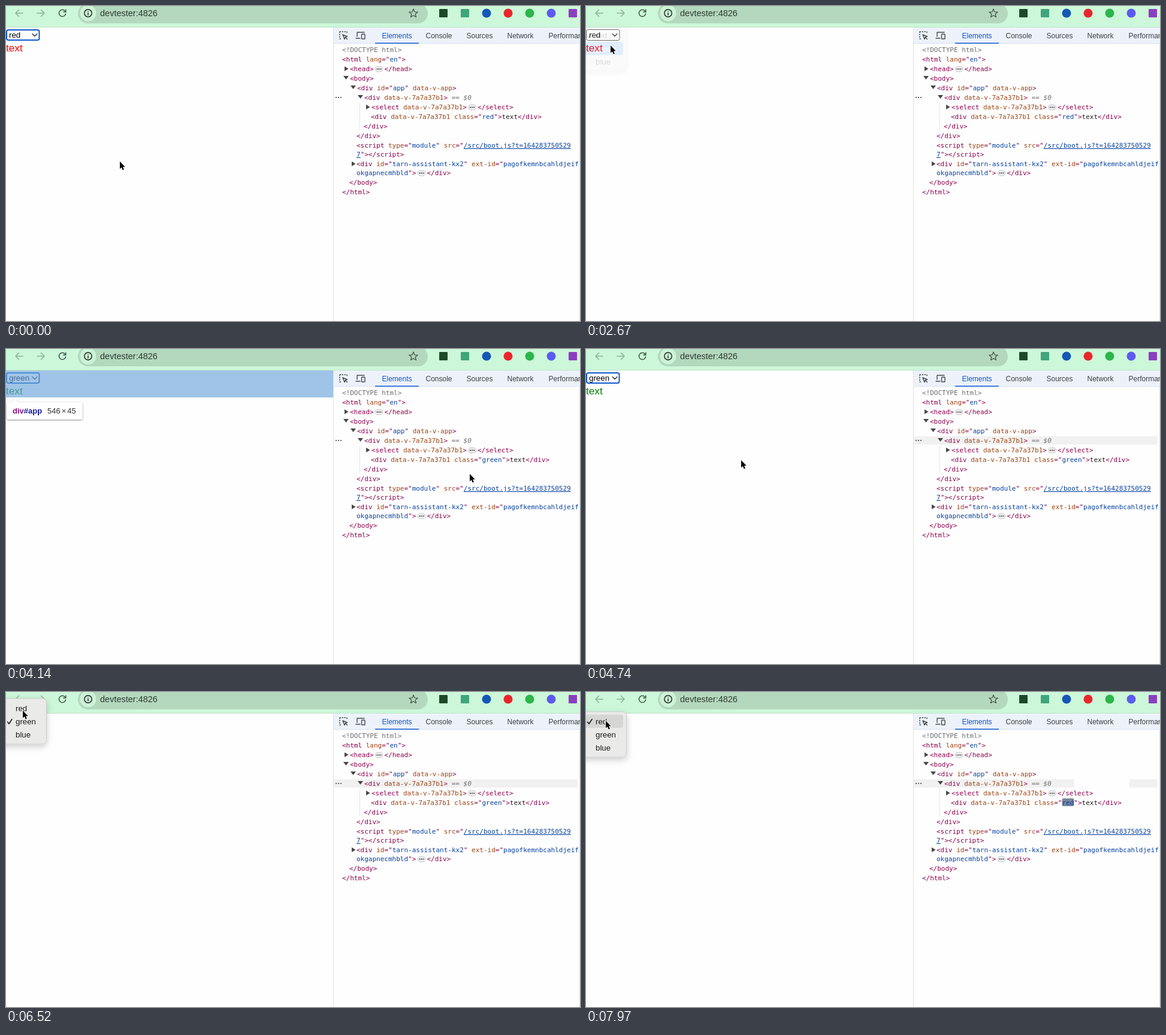
Write an HTML page that moves like this. It is 958x527 px and loops after 8 s.

```html
<!DOCTYPE html>
<html lang="en">
<head>
<meta charset="utf-8">
<title>Select demo</title>
<style>
html, body { margin: 0; width: 100%; height: 100%; overflow: hidden; background: #fefefe; }
svg { display: block; width: 100%; height: 100%; }
text { font-family: "Liberation Sans", Arial, sans-serif; white-space: pre; }
.code text { font: 11px "DejaVu Sans Mono", Menlo, monospace; }
.line { fill: none; stroke-linecap: round; stroke-linejoin: round; }
.t { fill: #8e004b; }
.n { fill: #9f4312; }
.v { fill: #0842a0; }
.l { fill: #0842a0; text-decoration: underline; }
.g { fill: #6e6e6e; }
.i { fill: #6e6e6e; font-style: italic; }
.x { fill: #1f1f1f; }
</style>
</head>
<body>
<svg viewBox="0 0 958 527" xmlns="http://www.w3.org/2000/svg">
  <defs>
    <filter id="soft" x="-30%" y="-30%" width="160%" height="170%">
      <feDropShadow dx="0" dy="4" stdDeviation="5.5" flood-opacity=".2"/>
    </filter>
    <filter id="tipShade" x="-20%" y="-40%" width="140%" height="190%">
      <feDropShadow dx="0" dy="1" stdDeviation="1.5" flood-opacity=".45"/>
    </filter>
  </defs>
  <rect width="958" height="527" fill="#fefefe"/>

  <!-- browser bar -->
  <rect width="958" height="36" fill="#ccf7d8"/>
  <rect y="35" width="958" height="1" fill="#bfe3ca"/>
  <rect x="120" y="-4" width="584" height="33" rx="16.5" fill="#b4d8be"/>
  <circle cx="137" cy="12" r="13.500" fill="#cdf3d7"/>
  <g class="line" stroke-width="1.5">
    <path d="M28 12H16.500M21.500 6.500L16 12l5.500 5.500M52 12h11.500M58.500 6.500L64 12l-5.500 5.500" stroke="#8fb29a"/>
    <path d="M98.500 8.500A5.600 5.600 0 1 0 99.600 13M99.800 6v4h-4" stroke="#46574b"/>
    <circle cx="137" cy="12" r="6.200" stroke="#1f2b23"/>
    <path d="M137 11.500v3.500M137 8.900v.1" stroke="#1f2b23"/>
    <path id="star" stroke="#46574b" stroke-width="1.3"/>
  </g>
  <text x="157" y="17" font-size="14.5" fill="#2b3a30">devtester:4826</text>
  <g id="badges"></g>

  <!-- page -->
  <rect id="box" fill="#fff"/>
  <text id="choice" x="5" y="53" font-size="13.33"/>
  <path class="line" d="M44 46.500l4 4 4-4" stroke="#222" stroke-width="1.2"/>
  <text id="word" x="0" y="76" font-size="17.2">text</text>
  <g id="overlay">
    <rect y="36" width="546" height="45" fill="rgb(111,168,220)" fill-opacity=".66"/>
    <path d="M4.500 89H8l6.500-6.500L21 89h103.500a3 3 0 0 1 3 3v23a3 3 0 0 1-3 3H4.500a3 3 0 0 1-3-3V92a3 3 0 0 1 3-3z" fill="#fff" filter="url(#tipShade)"/>
    <text x="11" y="108" font-size="13" font-weight="bold" fill="#881280">div<tspan fill="#1a1aa6">#app</tspan></text>
    <text x="69" y="108" font-size="13" fill="#333">546<tspan dx="2">×</tspan><tspan dx="2">45</tspan></text>
  </g>

  <!-- inspector -->
  <rect x="547" y="36" width="411" height="491" fill="#fefefe"/>
  <rect x="547" y="36" width="411" height="27" fill="#edf2fa"/>
  <path d="M546.500 36V527M547 62.500H958M957.500 63V527" stroke="#d5e3f8" fill="none"/>
  <rect x="616" y="61.500" width="73" height="1.500" fill="#0b57d0"/>
  <g class="line" stroke="#454a50" stroke-width="1.400">
    <path d="M557 43h12M557 43v12M569 43v3M557 55h3" stroke-dasharray="1.500 2.500"/>
    <path d="M562 48l7.500 3-3.200 1.300-1.300 3.200zM566 52l3.500 3.500"/>
    <path d="M586 51v-7h12M584 54h7"/>
    <rect x="593.500" y="47" width="5.500" height="8" rx=".8"/>
  </g>
  <g id="tabs" font-size="12"></g>
  <g id="rowShade" fill="#f1f1f1">
    <rect id="shadeA" x="547" y="146" height="14"/>
    <rect x="907" y="146" width="47" height="14"/>
  </g>
  <path d="M590.500 162V208" stroke="#e6e6e6"/>
  <rect id="flash" x="794.500" y="178" height="13" rx="2" fill="#7b869c"/>
  <g id="tree" class="code"></g>

  <!-- dropdown -->
  <g id="menu">
    <rect x="-12" y="33" width="79.500" height="76" rx="6" fill="#eaeae8" stroke="#c6c6c6" stroke-width=".8" filter="url(#soft)"/>
    <rect id="hover" x="-6" width="68" height="22" rx="4"/>
    <g id="items" font-size="13.300"></g>
    <path id="check" class="line" d="M2.500 50l2.500 3.300 5-7.800" stroke-width="1.600"/>
  </g>
  <path id="cursor" d="M0 0V12.600L2.800 10 4.700 14.500 6.900 13.600 5 9.200H8.800z" stroke="#fff" stroke-width="1.600" paint-order="stroke"/>
</svg>

<script>
const NS = 'http://www.w3.org/2000/svg';
const LOOP = 8000, STEP = 147.5;
const $ = id => document.getElementById(id);
const set = (el, attrs) => { for (const a in attrs) el.setAttribute(a, attrs[a]); };
const show = (el, on) => { el.style.display = on ? '' : 'none'; };
function add(parent, tag, attrs, text) {
  const el = document.createElementNS(NS, tag);
  set(el, attrs);
  if (text !== undefined) el.textContent = text;
  parent.appendChild(el);
  return el;
}

// Each part of a row starts with the letter of its colour class.
function row(x, y, parts) {
  const line = add($('tree'), 'text', { x, y: y + 4 });
  return parts.split('|').map(p => add(line, 'tspan', { class: p[0] }, p.slice(1)));
}
function fold(x, y, open) {
  const d = open ? `M${x - 4.5} ${y - 4}h9l-4.5 6z` : `M${x - 3} ${y - 4}l6.5 4-6.5 4z`;
  add($('tree'), 'path', { d, fill: '#474747' });
}
function dots(x, y, gap) {
  for (let i = -1; i < 2; i++) add($('tree'), 'circle', { cx: x + i * gap, cy: y, r: 1.1, fill: '#444' });
}
function more(x, y) {
  add($('tree'), 'rect', { x: x - 6.5, y: y - 4, width: 13, height: 9, rx: 4.5, fill: '#eee', stroke: '#bdbdbd', 'stroke-width': .8 });
  dots(x, y + .5, 3);
}

row(561, 73, 'g<!DOCTYPE html>');
row(561, 89, 't<html |nlang|t="|ven|t">');
row(574, 105, 't<head>');
row(631.5, 105, 't</head>');
row(574, 121, 't<body>');
row(586, 137, 't<div |nid|t="|vapp|t" |ndata-v-app|t>');
row(598, 153, 't<div |ndata-v-7a7a37b1|t>|g == |i$0');
row(610, 169, 't<select |ndata-v-7a7a37b1|t>');
row(787, 169, 't</select>');
const classValue = row(609, 185, 't<div |ndata-v-7a7a37b1 class|t="|vred|t">|xtext|t</div>')[3];
row(597, 201, 't</div>');
row(585, 217, 't</div>');
row(585, 233, 't<script |ntype|t="|vmodule|t" |nsrc|t="|l/src/boot.js?t=164283750529');
row(585, 248, 'l7|t"></' + 'script>');
row(585, 264, 't<div |nid|t="|vtarn-assistant-kx2|t" |next-id|t="|vpagofkemnbcahldjeif');
row(585, 279, 'vokgapnecmhbld|t">');
row(702.5, 279, 't</div>');
row(573, 295, 't</body>');
row(561, 311, 't</html>');
fold(568, 105); fold(567.5, 121, true); fold(579.5, 137, true);
fold(591.5, 153, true); fold(604, 169); fold(580, 264);
more(622.5, 105); more(778, 169); more(693.5, 279);
dots(555, 153, 4);

[['Elements', 627.5], ['Console', 700.5], ['Sources', 768.5], ['Network', 836.5], ['Performance', 905.5]]
  .forEach(([name, x], i) => add($('tabs'), 'text', { x, y: 53.5, fill: i ? '#3c4043' : '#0b57d0' }, name));

// Toolbar extensions: plain squares and circles.
[['#1c4a28', 1], ['#3fa57c', 1], ['#1556b8', 0], ['#e8262c', 0], ['#2cb54a', 0], ['#5b5bf0', 0], ['#8a3fc0', 1]]
  .forEach(([fill, square], i) => {
    const cx = 730 + 36 * i;
    if (square) add($('badges'), 'rect', { x: cx - 7, y: 5, width: 14, height: 14, rx: 1, fill });
    else add($('badges'), 'circle', { cx, cy: 12, r: 7.5, fill });
  });

let star = '';
for (let i = 0; i < 10; i++) {
  const r = i % 2 ? 3.3 : 7.5, a = i * Math.PI / 5;
  star += (i ? 'L' : 'M') + (680 + r * Math.sin(a)).toFixed(2) + ' ' + (12.5 - r * Math.cos(a)).toFixed(2);
}
set($('star'), { d: star + 'z' });

const labels = ['red', 'green', 'blue'];
const items = labels.map((name, i) => add($('items'), 'text', { x: 16, y: 54 + 22 * i }, name));

// Pointer stops: step, x, y
const stops = [
  [0, 190, 260], [6, 46, 48], [10, 46, 47], [11, 45, 53], [13, 41, 66], [19, 41, 66],
  [24, 470, 206], [25, 640, 214], [26, 780, 219], [28, 774, 209], [29, 735, 200],
  [30, 640, 155], [31, 430, 166], [32, 259, 186], [37, 31, 53], [40, 30, 53],
  [41, 29, 43], [42, 28, 31], [46, 28, 31], [51, 33, 48]
];
// Dropdown states: step, chosen item (-1 closed), hovered item, hover tone
const BLUE = '#4a98fb', GREY = '#d6d6d4';
const states = [
  [0, -1], [7, 0, 0, GREY], [10, 0, 0, BLUE], [12, 0, 1, BLUE], [17, 0, -1], [18, 0, 1, BLUE],
  [19, -1], [38, 1, 1, GREY], [41, 1, 1, BLUE], [42, 1, 0, BLUE], [44, 1, -1], [45, 1, 0, BLUE],
  [46, -1], [52, 0, 0, GREY]
];
const lastAt = (list, k) => list.filter(e => e[0] <= k).pop();
const PICKS = [19, 46], FLASH = 8.5;

function pointer(k) {
  const a = lastAt(stops, k), b = stops[stops.indexOf(a) + 1] || a;
  const u = b === a ? 0 : (k - a[0]) / (b[0] - a[0]);
  const e = u * u * (3 - 2 * u);
  return [a[1] + (b[1] - a[1]) * e, a[2] + (b[2] - a[2]) * e];
}

function drawMenu(k, fading) {
  const [, chosen, over, tone] = lastAt(states, k);
  show($('menu'), chosen >= 0);
  if (chosen < 0) return;
  set($('menu'), { transform: `translate(0 ${-22 * chosen})`, opacity: fading ? .16 : 1 });
  show($('hover'), over >= 0);
  if (over >= 0) set($('hover'), { y: 38 + 22 * over, fill: tone });
  const ink = i => i === over && tone === BLUE ? '#fff' : '#1c1c1c';
  items.forEach((el, i) => set(el, { fill: ink(i) }));
  set($('check'), { transform: `translate(0 ${22 * chosen})`, stroke: ink(chosen) });
}

function draw(t) {
  const k = Math.floor(t / STEP);
  const fading = PICKS.includes(k + 1);
  const green = k >= PICKS[0] && k < PICKS[1];
  const name = labels[green ? 1 : 0];

  $('choice').textContent = name;
  classValue.textContent = name;
  set($('word'), { fill: green ? '#008000' : '#f00' });
  const w = fading ? 1 : 2;
  set($('box'), {
    x: w / 2, y: 39 + w / 2, width: 56.5 - w, height: 19 - w, rx: 3,
    stroke: fading ? '#555' : '#0f5ac8', 'stroke-width': w
  });

  const [x, y] = pointer(k);
  set($('cursor'), { transform: `translate(${x.toFixed(1)} ${y.toFixed(1)})` });
  show($('overlay'), x > 547);
  show($('rowShade'), k >= 30);
  set($('shadeA'), { width: k >= PICKS[1] ? 268 : 407 });

  show($('flash'), PICKS.some(p => k >= p && k < p + FLASH));
  set($('flash'), { width: 6.62 * name.length });
  drawMenu(k, fading);
}

function tick() {
  draw(performance.now() % LOOP);
  requestAnimationFrame(tick);
}
tick();
</script>
</body>
</html>
```
